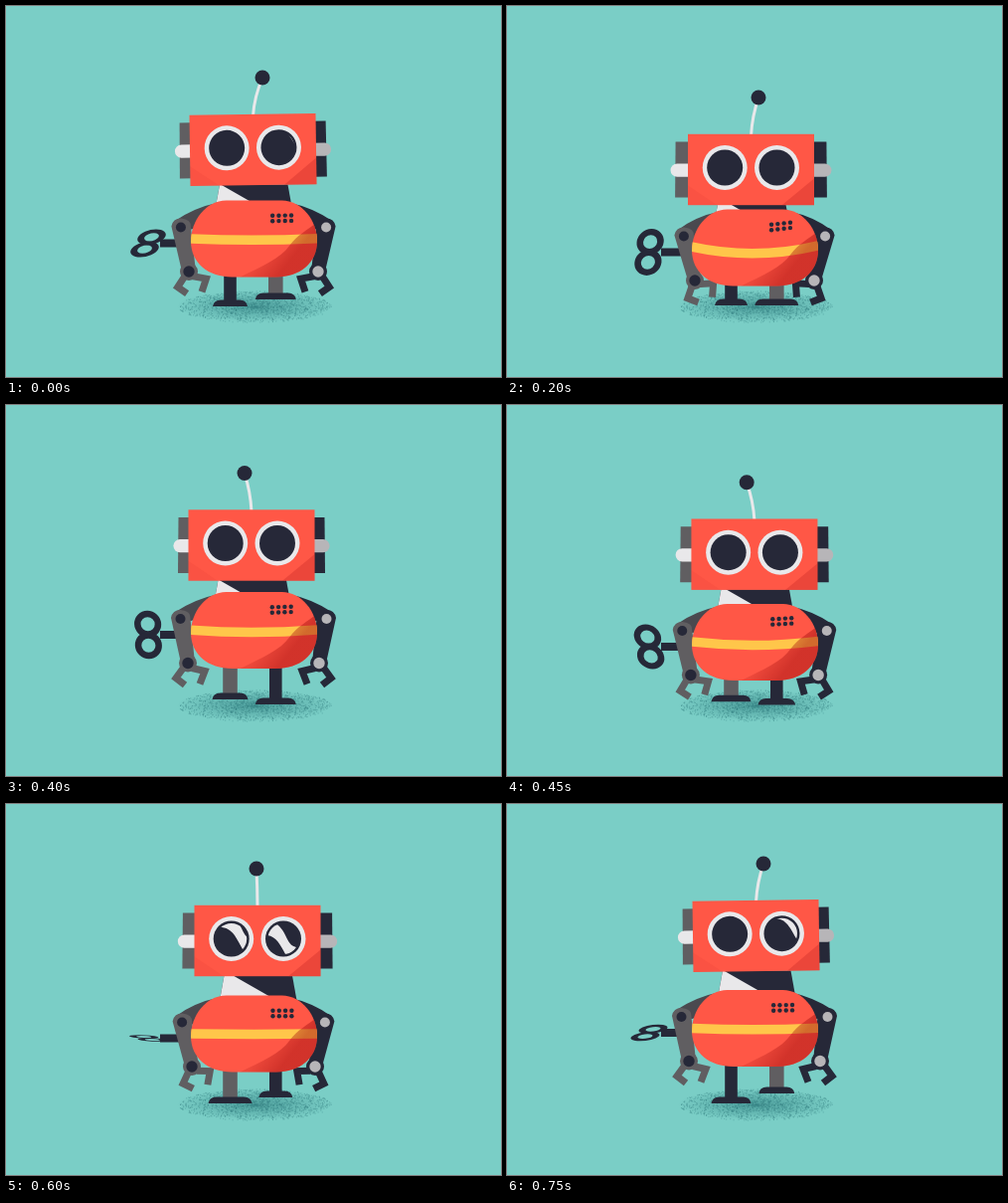
An HTML page with a canvas for the animation above (800 ms loop, 498 by 373 pixels).

```html
<!DOCTYPE html>
<html lang="en">
<head>
<meta charset="utf-8">
<title>Wind-up robot</title>
<style>
  html, body { margin: 0; width: 100%; height: 100%; overflow: hidden; background: #7acec6; }
  canvas { display: block; }
</style>
</head>
<body>
<canvas id="stage" width="498" height="373"></canvas>
<script>
const ctx = document.getElementById('stage').getContext('2d');
const LOOP = 800, STEP = 50, MID = 249.5;
const INK = '#262838', GREY = '#605e61', RED = '#ff5746', WHITE = '#e9e8ea', SILVER = '#b7b5b8';

// Poses around the loop; each row lines up with `times`.
const times = [0, 100, 200, 300, 400, 500, 600, 675, 750];
const tracks = {
  top:   [195.5, 211, 204.5, 190, 188, 210, 192.5, 186.5, 187],
  headX: [248.5, 246.5, 245.5, 246, 247, 251, 253, 252.5, 250.5],
  headY: [144.5, 165.5, 164.5, 146, 141, 157.5, 137.5, 130, 132.5],
  tilt:  [-0.8, -0.4, 0, 0, 0, 0, 0, -0.3, -0.8],
  ball:  [9.5, 9.5, 7.5, -1, -7, -7, -1, 5, 7.5],
  ears:  [0, 2, 3, 1, 0, 2, 2, 1, 0],
  sag:   [1, 5.5, 7, 4, 2, 4.5, 0, 0, 1],
  wrist: [184, 187, 189, 185, 183, 187, 187, 185, 183],
  wind:  [35, 55, 75, 88, 95, 133, 172, 186, 200],
  footL: [302, 301, 301, 293, 296, 300, 301, 301, 301],
  footR: [295, 299, 301, 301, 301, 301, 295, 289, 291],
  halfL: [17.5, 17, 16.5, 17, 18, 22, 22, 21, 20],
  halfR: [20.5, 22, 22, 21, 20.5, 17, 17, 17, 18]
};

// Smooth periodic curve through a track; `turn` is its gain per loop.
function sample(values, t, turn = 0) {
  const n = times.length;
  const key = i => {
    const lap = Math.floor(i / n), k = i - lap * n;
    return [times[k] + lap * LOOP, values[k] + lap * turn];
  };
  let i = n - 1;
  while (times[i] > t) i--;
  const [a, b, c, d] = [i - 1, i, i + 1, i + 2].map(key);
  const span = c[0] - b[0], u = (t - b[0]) / span;
  const m0 = (c[1] - a[1]) / (c[0] - a[0]) * span;
  const m1 = (d[1] - b[1]) / (d[0] - b[0]) * span;
  const rise = c[1] - b[1];
  return b[1] + u * (m0 + u * (3 * rise - 2 * m0 - m1 + u * (m0 + m1 - 2 * rise)));
}

function fill(shape, color) {
  ctx.fillStyle = color;
  ctx.fill(new Path2D(shape));
}
function stroke(shape, color, width) {
  ctx.strokeStyle = color;
  ctx.lineWidth = width;
  ctx.stroke(new Path2D(shape));
}
function disc(x, y, r, color) {
  ctx.fillStyle = color;
  ctx.beginPath();
  ctx.arc(x, y, r, 0, 7);
  ctx.fill();
}
function rect(x, y, w, h, color) {
  ctx.fillStyle = color;
  ctx.fillRect(x, y, w, h);
}
function group(draw) {
  ctx.save();
  draw();
  ctx.restore();
}

let seed = 7;
const random = () => (seed = seed * 16807 % 2147483647) / 2147483647;
const grains = Array.from({ length: 1500 }, () => {
  const angle = random() * 6.283, r = Math.pow(random(), 0.7);
  return [250 + 77 * r * Math.cos(angle), 302 + 16 * r * Math.sin(angle)];
});

function drawShadow() {
  group(() => {
    ctx.translate(250, 302);
    ctx.scale(1, 0.2);
    const g = ctx.createRadialGradient(0, 0, 15, 0, 0, 78);
    g.addColorStop(0, 'rgba(60,140,140,.6)');
    g.addColorStop(1, 'rgba(60,140,140,0)');
    disc(0, 0, 78, g);
  });
  for (const [x, y] of grains) rect(x, y, 1, 1, 'rgba(50,125,128,.4)');
}

function drawKey(p) {
  const y = p.top + 43, angle = p.wind * Math.PI / 180;
  rect(155, y - 4, 35, 8, INK);
  group(() => {
    ctx.transform(1, 0, -0.4 * Math.cos(angle), Math.sin(angle) || 0.01, 143, y);
    ctx.strokeStyle = INK;
    ctx.lineWidth = 6.5;
    for (const v of [-10.7, 10.7]) {
      ctx.beginPath();
      ctx.arc(0, v, 10.3, 0, 7);
      ctx.stroke();
    }
  });
}

function drawLeg(x, hip, ground, half, color) {
  const w = color === INK ? 6.3 : 7.3;
  rect(x - w, hip, 2 * w, ground - hip - 4, color);
  fill(`M${x - half} ${ground} q1-6.5 8-6.5 h${2 * half - 16} q7 0 8 6.5z`, INK);
}

// Left arm; the right one is the same drawing mirrored.
function drawArm(p, color, upper, joint) {
  const bend = p.wrist - 183;
  const sx = 175.5 + bend * 0.4, sy = p.top + 27, wx = p.wrist, wy = p.top + 71.5;
  fill(`M${sx - 9} ${sy} L${sx - 5} ${sy - 7} Q190 ${p.top + 7} 214 ${p.top + 2} V${p.top + 16} L${sx + 11} ${sy + 2}z`, upper);
  fill(`M${sx - 9.5} ${sy - 1} Q${sx - 8} ${sy - 9} ${sx} ${sy - 9} Q${sx + 11} ${sy - 8} ${sx + 10} ${sy} L${wx + 7} ${wy} H${wx - 7}z`, color);
  group(() => {
    ctx.translate(wx, wy);
    ctx.rotate(-bend * 2.8 * Math.PI / 180);
    ctx.lineJoin = 'miter';
    stroke('M-4 4 L-12 15 L-3 22', color, 7);
    stroke('M4 5 L17 8 L12 21', color, 7);
  });
  disc(wx, wy, 9, color);
  disc(wx, wy, 5.7, joint);
  disc(sx, sy, 5, joint);
}

function drawBody(p) {
  group(() => {
    ctx.translate(MID, p.top);
    const hull = 'M-28 0 H28 C48 0 63.5 20 63.5 41 C63.5 63 46 77 22 77 H-22 C-46 77-63.5 63-63.5 41 C-63.5 20-48 0-28 0z';
    fill(hull, RED);
    ctx.clip(new Path2D(hull));
    const s = p.sag;
    stroke(`M-66 ${38.5 - s * 0.2} Q0 ${39.5 + s * 1.8} 66 ${38.5 - s * 0.4}`, '#ffc64a', 9.5);
    const shade = ctx.createLinearGradient(18, 45, 52, 72);
    shade.addColorStop(0, 'rgba(165,15,15,.2)');
    shade.addColorStop(0.55, 'rgba(165,15,15,.5)');
    fill('M66 20 C55 29 44 34 36 45 C26 59 8 66-16 78 H66z', shade);
    for (let i = 0; i < 8; i++) {
      const col = i % 4, row = i >> 2;
      disc(19 - s * 0.35 + col * 6.3, 15.3 - col * s * 0.1 + row * 5.4, 2.2, INK);
    }
  });
}

function drawNeck(p) {
  const x = p.headX + 0.5, y = p.headY + 35, low = p.top + 8, h = low - y;
  const flare = h * 0.18, start = x - 33 + p.ears * 4;
  fill(`M${x - 34} ${y} H${x + 34.5} L${x + 34.5 + flare} ${low} H${x - 34 - flare}z`, INK);
  fill(`M${x - 34} ${y} H${start} L${start + h * 1.75} ${low} H${x - 34 - flare}z`, WHITE);
}

function drawEye(x, glint) {
  group(() => {
    ctx.translate(x, -2);
    disc(0, 0, 22.5, WHITE);
    disc(0, 0, 18, INK);
    ctx.beginPath();
    ctx.arc(0, 0, 15.5, 0, 7);
    ctx.clip();
    ctx.rotate(-Math.PI / 4);
    ctx.translate(glint, 0);
    fill('M-9-18 C3-8-3 2-7 18 H10 C-2 8 14-2 9-18z', WHITE);
  });
}

function drawHead(p, t) {
  // The reflection enters fast, then slides across the eye.
  const glint = delay => {
    const s = (t - 500 - delay + LOOP + 100) % LOOP - 100;
    return -4 + s * (s < 0 ? 0.45 : 0.11);
  };
  group(() => {
    ctx.translate(p.headX, p.headY);
    stroke(`M0-34 Q${p.ball * 0.15}-54 ${p.ball}-72`, WHITE, 3);
    disc(p.ball, -72.5, 7.5, INK);
    ctx.rotate(p.tilt * Math.PI / 180);
    const e = p.ears * 0.8;
    for (const [side, plate, cap] of [[-1, GREY, WHITE], [1, INK, SILVER]]) {
      group(() => {
        ctx.scale(side, 1);
        fill(`M60-28 H${73.5 + e} L${74 + e} 28 H60z`, plate);
        fill(`M60-6 H${72 + e} a6.6 6.6 0 0 1 0 13.2 H60z`, cap);
      });
    }
    rect(-63.5, -35.7, 127, 71.4, RED);
    fill('M63.5 9 V35.7 H31z', 'rgba(190,30,30,.3)');
    fill('M-63.5 16 V35.7 H-34z', 'rgba(190,30,30,.07)');
    drawEye(-26.3, glint(0));
    drawEye(26, glint(100));
  });
}

function draw(t) {
  const p = {};
  for (const name in tracks) p[name] = sample(tracks[name], t, name === 'wind' ? 180 : 0);
  const leftIsDark = t < 300 || t >= 675;
  rect(0, 0, 498, 373, '#7acec6');
  drawShadow();
  drawKey(p);
  drawNeck(p);
  drawLeg(225.5, p.top + 70, p.footL, p.halfL, leftIsDark ? INK : GREY);
  drawLeg(271.3, p.top + 70, p.footR, p.halfR, leftIsDark ? GREY : INK);
  drawArm(p, GREY, '#4a494f', INK);
  group(() => {
    ctx.translate(498, 0);
    ctx.scale(-1, 1);
    drawArm(p, INK, INK, SILVER);
  });
  drawBody(p);
  drawHead(p, t);
}

const start = performance.now();
function tick() {
  const t = (performance.now() - start) % LOOP;
  draw(Math.floor(t / STEP) * STEP);
  requestAnimationFrame(tick);
}
tick();
</script>
</body>
</html>
```
